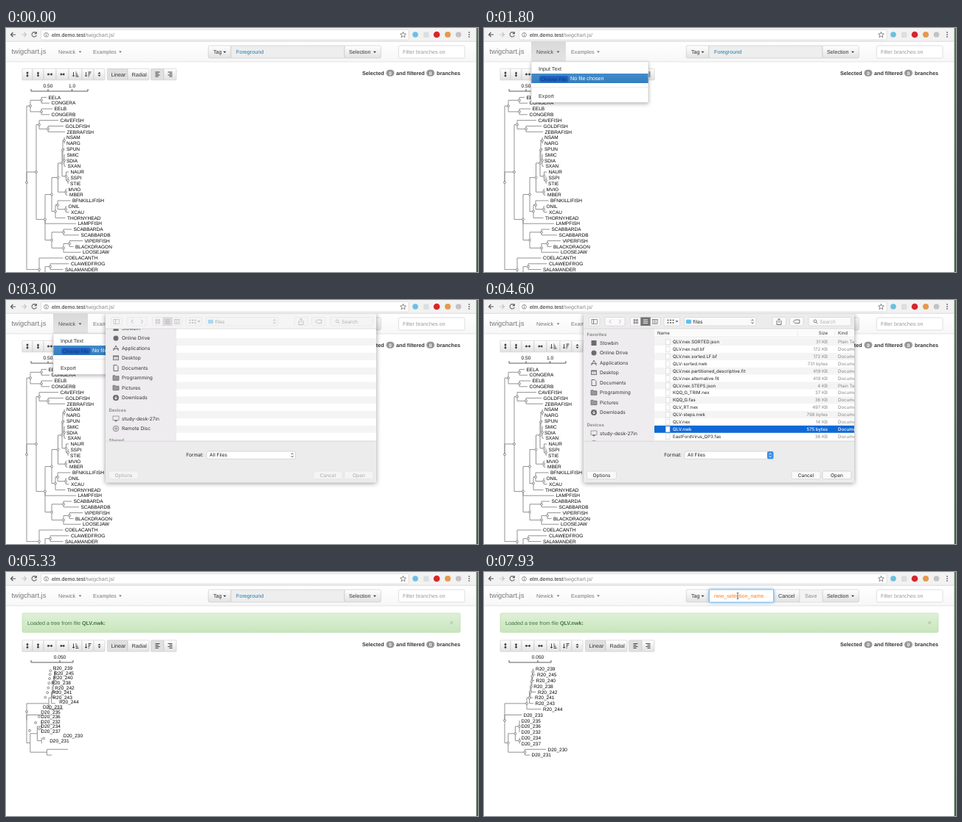
An HTML page for the animation above (8 s loop, 640 px wide and 332 px high).

```html
<!DOCTYPE html>
<html lang="en">
<head>
<meta charset="utf-8">
<title>Tree viewer</title>
<style>
  html, body { margin: 0; width: 100%; height: 100%; overflow: hidden; background: #fff; }
  svg { display: block; width: 100%; height: 100%; font-family: "Liberation Sans", Arial, sans-serif; }
  text { white-space: pre; text-rendering: geometricPrecision; }
  .mac { font-family: Inter, "Open Sans", sans-serif; }
  .menu { filter: drop-shadow(0 2px 2.5px #0004); }
  .sheet { filter: drop-shadow(0 1px 3px #0006); }
  .focus { filter: drop-shadow(0 0 2px #66afe9); }
</style>
</head>
<body>
<svg id="stage" viewBox="0 0 640 332" preserveAspectRatio="none"></svg>
<script>
const LOOP = 8000;
const TIMES = {
  hover: 900, menuOpen: 1130, menuPick: 1500,
  sheetIn: 2553, sheetReady: 3100, filePick: 4130, sheetOut: 4740,
  loaded: 5166, naming: 7130
};
const SLIDE = 250;

// Markup helpers; text is placed by its vertical centre.
const text = (x, y, s, size = 7.2, fill = '#333', attrs = '') =>
  `<text x="${x}" y="${y + size * 0.35}" font-size="${size}" fill="${fill}" ${attrs}>${s}</text>`;
const rect = (x1, y1, x2, y2, fill, stroke = 'none', r = 0) =>
  `<rect x="${x1}" y="${y1}" width="${x2 - x1}" height="${y2 - y1}" rx="${r}" fill="${fill}" stroke="${stroke}" stroke-width=".6"/>`;
const circle = (x, y, r, fill, stroke = 'none') =>
  `<circle cx="${x}" cy="${y}" r="${r}" fill="${fill}" stroke="${stroke}" stroke-width=".7"/>`;
const path = (d, stroke, width = 1, fill = 'none') =>
  `<path d="${d}" fill="${fill}" stroke="${stroke}" stroke-width="${width}"/>`;
const group = (id, body, attrs = '') => `<g id="${id}" ${attrs}>${body}</g>`;
const caret = (x, y, fill) => path(`M${x - 2} ${y - 1}h4l-2 2.2z`, 'none', 0, fill);
const gradient = (id, top, bottom) =>
  `<linearGradient id="${id}" x2="0" y2="1"><stop stop-color="${top}"/><stop offset="1" stop-color="${bottom}"/></linearGradient>`;
const middle = 'text-anchor="middle"', end = 'text-anchor="end"', bold = 'font-weight="bold"';

const defs = `<defs>
  ${gradient('bar', '#fff', '#f7f7f7')}${gradient('button', '#fff', '#e2e2e2')}
  ${gradient('active', '#d9d9d9', '#e4e4e4')}${gradient('success', '#dff0d8', '#c8e5bc')}
  ${gradient('blue', '#428bca', '#357ebd')}${gradient('desk', '#4f7d49', '#2f6d35')}
  <clipPath id="belowBar"><rect x="100" y="18.5" width="440" height="314"/></clipPath>
  <clipPath id="sidebar"><rect x="135" y="39" width="96" height="153"/></clipPath>
  <clipPath id="list"><rect x="231" y="39" width="271" height="153"/></clipPath>
</defs>`;

function browserBar() {
  const dots = [6, 9, 12].map(y => circle(628, y, 0.9, '#666')).join('');
  return rect(0, 0, 638, 18, '#f2f2f2') + rect(0, 17.8, 638, 18.5, '#c9c9c9')
    + rect(47.5, 2.5, 546, 16, '#fff', '#d2d2d2', 1.5)
    + path('M13 9H6.5M9.5 6l-3 3 3 3', '#555', 1.1) + path('M21 9h6.5M24.5 6l3 3-3 3', '#c4c4c4', 1.1)
    + path('M41 7.2a3.2 3.2 0 1 0 .3 2.6M41.4 5v2.6h-2.6', '#666', 1.1)
    + circle(54.5, 9.3, 2.9, 'none', '#666') + path('M54.5 8.8v2.2M54.5 7.2v.8', '#666', 0.8)
    + text(62, 9.3, 'elm.demo.test<tspan fill="#888">/twigchart.js/</tspan>', 7.2, '#222')
    + path('M538.5 5.3l1.1 2.6 2.8.2-2.1 1.8.6 2.8-2.4-1.5-2.4 1.5.6-2.8-2.1-1.8 2.8-.2z', '#555', 0.7)
    + circle(555, 9, 3.8, '#69bfe4') + rect(566, 5.5, 573.5, 13, '#dedede', 'none', 1)
    + circle(584, 9, 4.3, '#d9252a') + circle(599, 9, 4, '#e59a4b') + circle(613.5, 9, 3.8, '#c3c3c3') + dots;
}

function navbar() {
  return rect(0, 18.5, 638, 46, 'url(#bar)') + rect(0, 45.6, 638, 46.3, '#d9d9d9')
    + text(7.5, 32, 'twigchart.js', 9.4, '#777')
    + group('newickActive', rect(64, 18.5, 111, 45.6, 'url(#active)'))
    + group('newick', text(71, 32, 'Newick', 7.2, 'currentColor') + caret(100.5, 32.5, 'currentColor'))
    + text(118, 32, 'Examples', 7.2, '#777') + caret(155, 32.5, '#777')
    + rect(274.3, 24, 305, 41, 'url(#button)', '#c4c4c4', 2)
    + text(281, 32.5, 'Tag') + caret(296.5, 32.8, '#333')
    + group('foreground', rect(305, 24, 459, 41, '#eee', '#c4c4c4') + text(312, 32.5, 'Foreground', 7.2, '#1f77b4'))
    + rect(459, 24, 508.3, 41, 'url(#button)', '#c4c4c4', 2)
    + text(465, 32.5, 'Selection') + caret(500, 32.8, '#333')
    + group('naming', rect(393, 24, 428, 41, 'url(#button)', '#c4c4c4') + text(399, 32.5, 'Cancel')
      + rect(428, 24, 459, 41, '#f3f3f3', '#d4d4d4') + text(435, 32.5, 'Save', 7.2, '#888')
      + `<g class="focus">${rect(305.3, 24, 392.7, 41, '#fff', '#4fa3ea')}</g>`
      + text(312, 32.5, 'new_selection_name', 7.2, '#ff7f0e')
      + path('M342.7 28.5h2.6M344 28.5v8M342.7 36.5h2.6', '#444', 0.7))
    + rect(532.3, 24, 622, 41, '#fff', '#ccc', 2) + text(538, 32.5, 'Filter branches on', 7.2, '#999');
}

// Button row above the tree, drawn around a centre line at y = 63.
function controls() {
  const button = (x1, x2, fill = 'url(#button)') => rect(x1, 55.3, x2, 70.8, fill, '#c8c8c8', 1);
  const edges = [22, 36, 51, 68, 85, 103, 119, 134];
  const sorter = widths => path('M-2.5-3V3M-4 1.5L-2.5 3-1 1.5', '#333', 0.9)
    + path(widths.map((w, i) => `M.5 ${i * 2 - 3}h${w}`).join(''), '#333', 1);
  const icons = [
    path('M0-3V3M-1.3-1.7L0-3 1.3-1.7M-1.3 1.7L0 3 1.3 1.7', '#333', 1.1),
    path('M0-3.2V3.2M-1.3-2.2L0-.8 1.3-2.2M-1.3 2.2L0 .8 1.3 2.2', '#333', 1.1),
    path('M-3 0H3M-1.7-1.3L-3 0-1.7 1.3M1.7-1.3L3 0 1.7 1.3', '#333', 1.1),
    path('M-3.2 0H3.2M-2.2-1.3L-.8 0-2.2 1.3M2.2-1.3L.8 0 2.2 1.3', '#333', 1.1),
    sorter([1, 2, 3, 4]), sorter([4, 3, 2, 1]),
    path('M-2-.7h4L0-3zM-2 .7h4L0 3z', 'none', 0, '#333')
  ];
  const row = icons.map((icon, i) => button(edges[i], edges[i + 1])
    + `<g transform="translate(${(edges[i] + edges[i + 1]) / 2} 63)">${icon}</g>`).join('');
  const lines = (x, dir) => path([6, 4, 6, 4].map((w, i) => `M${x} ${60 + i * 2}h${dir * w}`).join(''), '#333', 0.9);
  const badge = x => rect(x - 5.5, 56.8, x + 5.5, 65.8, '#999', 'none', 4.5) + text(x, 61.3, '0', 6.4, '#fff', bold + ' ' + middle);
  return row + button(137.3, 165, '#e0e0e0') + button(165, 194)
    + text(142.5, 63, 'Linear') + text(170.5, 63, 'Radial')
    + button(196.5, 214, '#e0e0e0') + button(214, 231) + lines(202.5, 1) + lines(225.5, -1)
    + text(483, 61.3, 'Selected', 7.2, '#333', bold) + badge(521)
    + text(529, 61.3, 'and filtered', 7.2, '#333', bold) + badge(575.5)
    + text(584, 61.3, 'branches', 7.2, '#333', bold);
}

const scaleBar = (y, right, ticks) =>
  path(`M34 ${y - 3}V${y}H${right}V${y - 3}` + ticks.map(([x]) => `M${x} ${y - 3}V${y}`).join(''), '#333', 0.8)
  + ticks.map(([x, label]) => text(x, y - 7, label, 6.6, '#111', middle)).join('');

// Reads nested (children)name:x notation; leaves take successive rows.
function parseTree(source, top) {
  const nodes = [];
  let pos = 0, row = 0;
  function read() {
    const kids = [];
    if (source[pos] === '(') {
      do { pos++; kids.push(read()); } while (source[pos] === ',');
      pos++;
    }
    const [all, name, x] = /^(\w*):([\d.]+)/.exec(source.slice(pos));
    pos += all.length;
    const y = kids.length ? kids.reduce((sum, k) => sum + k.y, 0) / kids.length : top + 7.807 * row++;
    const node = { name, x: +x, y, kids };
    nodes.push(node);
    return node;
  }
  read();
  return nodes;
}

function drawTree(nodes) {
  const branches = nodes.flatMap(n => n.kids.map(k => `M${n.x} ${n.y}V${k.y}H${k.x}`)).join('');
  return path(branches, '#929292', 1) + nodes.map(n => `<g class="node" transform="translate(${n.x} ${n.y})">`
    + (n.kids.length ? circle(0, 0, 1.5, '#eee', '#707070') : text(2.5, 0, n.name, 6.5, '#000')) + '</g>').join('');
}

const fishTree = parseTree('(((EELA:55,CONGERA:59):48,(EELB:63,CONGERB:59):48):33,'
  + '((CAVEFISH:71,(GOLDFISH:78,ZEBRAFISH:80):57):45,'
  + '((((((NSAM:79.5,NARG:79.5):79,SPUN:79.5,(SMIC:80,SDIA:79.5,SXAN:81):79):77,'
  + '(NAUR:85,(SSPI:85,STIE:84.5):84):81.5):76,(MVIO:82,MBER:83.5):81):70.5,'
  + '((BFNKILLIFISH:87.5,(ONIL:82,XCAU:85.5):81):70,THORNYHEAD:80.5):67):62,LAMPFISH:95,'
  + '((SCABBARDA:89,SCABBARDB:99):78,((VIPERFISH:104,BLACKDRAGON:91.5):86,LOOSEJAW:101.5):78):62):53):41,'
  + '(COELACANTH:77.5,((CLAWEDFROG:85.5,SALAMANDER:77.5):60,(' + Array(8).fill(':70').join() + '):62):53):45):28', 94.4);

const sampleTree = parseTree('((((((((R20_239:67.5,R20_245:69.5):66.3,R20_240:68):65.5,R20_238:64.8):64.8,'
  + 'R20_242:70.5):64,R20_241:66.5):62.8,R20_243:67):61.5,R20_244:77.5):58,D20_233:51,'
  + '(((D20_235:48,D20_236:48,D20_232:48):48,(D20_234:48.2,D20_237:48.2):48.2):42.4,'
  + '(D20_230:84,D20_231:62):55.5):32.8):28', 132);

const alertBox = () => rect(22, 56, 616, 82.3, 'url(#success)', '#b2dba1', 2)
  + text(29, 69, `Loaded a tree from file <tspan ${bold}>QLV.nwk:</tspan>`, 7.2, '#3c763d')
  + path('M602.2 67l4 4m0-4l-4 4', '#a3bd9b', 0.9);

const newickMenu = () => `<g class="menu">${rect(64, 45.8, 223, 101.3, '#fff', '#c8c8c8', 1.5)}</g>`
  + text(74, 55.3, 'Input Text')
  + group('choosePlain', text(75, 68.3, 'Choose File') + text(117, 68.3, 'No file chosen'))
  + group('chooseHot', rect(64.3, 62, 222.7, 75, 'url(#blue)') + rect(75, 65, 114.5, 74, '#1f62c0', 'none', 3)
    + text(77, 69.3, 'Choose File', 6.6, '#0f3570') + text(117, 68.3, 'No file chosen', 7.2, '#fff'))
  + rect(64.3, 80, 222.7, 80.6, '#e0e0e0') + text(74, 92, 'Export');

const FILES = [
  ['QLV.nex.SORTED.json', '31 KB'], ['QLV.nex.null.bf', '172 KB'], ['QLV.nex.sorted.LF.bf', '172 KB'],
  ['QLV-sorted.nwk', '731 bytes'], ['QLV.nex.partitioned_descriptive.fit', '419 KB'],
  ['QLV.nex.alternative.fit', '419 KB'], ['QLV.nex.STEPS.json', '4 KB'], ['KQQ_G_TRIM.nex', '37 KB'],
  ['KQQ_G.fas', '36 KB'], ['QLV_RT.nex', '497 KB'], ['QLV-steps.nwk', '798 bytes'], ['QLV.nex', '14 KB'],
  ['QLV.nwk', '575 bytes'], ['EastFordVirus_QP3.fas', '36 KB']
];
const PICKED = 12;
const rowY = i => 57 + 9.9 * i;
const rowBand = (i, fill) => rect(231, rowY(i) - 4.95, 502, rowY(i) + 4.95, fill);

function fileRow(i, nameFill, infoFill, attrs) {
  const [name, size] = FILES[i], y = rowY(i);
  const kind = name.endsWith('json') ? 'Plain Text' : 'Document';
  return rect(246.5, y - 3.8, 252, y + 3.8, '#fff', '#d0d0d0') + text(256, y, name, 6.1, nameFill, attrs)
    + text(466, y, size, 6.1, infoFill, attrs + ' ' + end) + text(480, y, kind, 6.1, infoFill, attrs);
}

function sidebar(shift) {
  const ink = '#6c6c6c';
  const icons = [
    ['Stowbin', rect(-3.5, -3.5, 3.5, 3.5, ink)],
    ['Online Drive', circle(0, 0, 3.5, ink)],
    ['Applications', path('M-3.5 3.5L0-3.5 3.5 3.5M-4 1H4', ink)],
    ['Desktop', rect(-4, -3.5, 4, 3, ink) + rect(-3.2, -1.8, 3.2, 2.2, '#d6d6d6')],
    ['Documents', path('M-3-4h4l2 2v6h-6z', ink)],
    ['Programming', path('M-4 3.2v-6.4h3l1 1h4v5.4z', ink, 0.8, '#999')],
    ['Pictures', path('M-4 3.2v-6.4h3l1 1h4v5.4z', ink, 0.8, '#999')],
    ['Downloads', circle(0, 0, 4, ink) + path('M0-2.2v4M-1.7.2L0 2l1.7-1.8', '#fff')]
  ];
  const computers = [
    ['study-desk-27in', rect(-4, -3.5, 4, 2, 'none', ink) + rect(-1.5, 2, 1.5, 3.7, ink)],
    ['Remote Disc', circle(0, 0, 3.8, '#ddd', ink) + circle(0, 0, 1.2, '#eee', ink)]
  ];
  const item = (first, step) => ([name, icon], i) => {
    const y = first + i * step;
    return `<g transform="translate(149 ${y})">${icon}</g>` + text(157, y, name, 6.6, '#333');
  };
  const heading = (y, s) => text(139.5, y, s, 6, '#808080', 'font-weight="600"');
  return `<g clip-path="url(#sidebar)">${rect(135, 39, 231, 192, '#eeecef')}<g transform="translate(0 ${shift})">`
    + heading(47, 'Favorites') + icons.map(item(58.5, 13.5)).join('')
    + heading(170, 'Devices') + computers.map(item(181.5, 13.5)).join('') + heading(211, 'Shared') + '</g></g>';
}

function fileDialog(ready) {
  const ink = ready ? '#555' : '#b5b5b5', face = ready ? '#fafafa' : '#f4f4f4', edge = ready ? '#cfcfcf' : '#e2e2e2';
  const label = ready ? '#222' : '#aaa';
  const box = (x1, x2) => rect(x1, 23.5, x2, 35, face, edge, 1.5);
  const panel = rect(146, 26.3, 153.5, 32.3, 'none', ink) + path('M148.6 26.3v6', ink, 0.8);
  const chevrons = path('M172.5 26.7l-2.5 2.6 2.5 2.6M183 26.7l2.5 2.6-2.5 2.6', '#b0b0b0', 0.9);
  const squares = path('M203 26.5h2v2h-2zM206.5 26.5h2v2h-2zM203 30h2v2h-2zM206.5 30h2v2h-2z', ink, 0.7);
  const lines = path('M215.8 27h6.4M215.8 29.3h6.4M215.8 31.6h6.4', ready ? '#fff' : ink, 0.9);
  const columns = rect(228.5, 26.3, 235.5, 32.3, 'none', ink) + path('M230.8 26.3v6M233.2 26.3v6', ink, 0.7);
  const arrows = (x, y, color) => path(`M${x - 1.5} ${y - 1}l1.5-1.7 1.5 1.7M${x - 1.5} ${y + 1}l1.5 1.7 1.5-1.7`, color, 0.9);
  const button = (x1, x2, s, fill) => rect(x1, 233, x2, 243.5, face, edge, 2) + text((x1 + x2) / 2, 238.3, s, 6.6, fill, middle);

  const toolbar = box(142.5, 157) + panel + box(164, 191) + chevrons
    + box(198.5, 239) + rect(212.3, 23.5, 225.7, 35, ready ? '#737373' : '#dadada') + squares + lines + columns
    + box(244, 265.5) + path('M248.5 27.5h2M252 27.5h2M255.5 27.5h2M248.5 31h2M252 31h2M255.5 31h2', ink, 1.6) + caret(261.5, 29.2, ink)
    + box(271.5, 369) + rect(274, 26.7, 281, 32.2, ready ? '#62bdea' : '#a8d8ee', 'none', 0.8)
    + text(283.5, 29.3, 'files', 6.6, label) + arrows(364, 29.3, ink)
    + box(391, 409.5) + path('M398 28.5h-1v5h6v-5h-1M400 31v-5.5M398.3 27l1.7-1.7 1.7 1.7', ink, 0.8)
    + box(414.5, 433) + path('M419.5 29.3l2.3-2.3h6v4.6h-6z', ink, 0.8)
    + box(440, 497.5) + circle(449, 28.8, 1.9, 'none', ink) + path('M450.4 30.2l2 2', ink, 0.9)
    + text(455, 29.3, 'Search', 6.6, '#b0b0b0');

  const stripes = Array.from({ length: 8 }, (_, i) => rowBand(2 * i, '#f4f4f4')).join('');
  const header = rect(231, 39, 502, 50.5, '#fbfbfb') + rect(231, 50.3, 502, 50.8, '#d5d5d5')
    + text(235, 45, 'Name', 6.1, '#333') + text(466, 45, 'Size', 6.1, '#333', end) + text(480, 45, 'Kind', 6.1, '#333')
    + path('M425 41v8M476 41v8', '#e2e2e2', 0.6);
  const rows = FILES.map((_, i) => fileRow(i, '#222', '#858585', '')).join('');
  const list = `<g clip-path="url(#list)">${rect(231, 39, 502, 192, '#fff') + stripes + (ready ? header + rows : '')}</g>`;

  const format = text(268, 211, 'Format:', 6.6, '#222', end) + rect(272, 206, 392.5, 216.3, '#fff', '#c4c4c4', 2)
    + text(276, 211, 'All Files', 6.6, '#222')
    + (ready ? rect(384, 206, 392.5, 216.3, '#3d8fe6', 'none', 2) : '') + arrows(388.2, 211.2, ready ? '#fff' : '#444');

  return rect(135, 18, 502, 248.5, '#ececec') + rect(135, 18, 502, 39, ready ? '#ececec' : '#f5f5f5')
    + toolbar + sidebar(ready ? 0 : -20) + list + path('M135 39h367M135 192.2h367', '#d0d0d0', 0.7) + format
    + button(139.5, 179.5, 'Options', label) + button(417, 456, 'Cancel', label) + button(459, 498, 'Open', '#aaa');
}

const pickedFile = () => `<g clip-path="url(#list)">`
  + rowBand(PICKED, '#1169d6') + fileRow(PICKED, '#fff', '#fff', 'font-weight="500"') + '</g>'
  + rect(459, 233, 498, 243.5, '#fafafa', '#cfcfcf', 2) + text(478.5, 238.3, 'Open', 6.6, '#222', middle);

const stage = document.getElementById('stage');
stage.innerHTML = defs + rect(0, 0, 640, 332, '#fff')
  + group('fish', scaleBar(86, 111, [[57, '0.50'], [89.5, '1.0']]) + drawTree(fishTree))
  + group('sample', alertBox() + scaleBar(123, 91, [[73, '0.050']]) + drawTree(sampleTree))
  + group('controls', controls())
  + navbar() + group('menu', newickMenu())
  + `<g clip-path="url(#belowBar)">${group('sheet',
      group('idle', fileDialog(false)) + group('ready', fileDialog(true)) + group('picked', pickedFile()),
      'class="sheet mac"')}</g>`
  + browserBar() + rect(637, 0, 638, 332, '#c2c2c2') + rect(638, 0, 640, 332, 'url(#desk)');

const byId = id => document.getElementById(id);
const show = (id, on) => byId(id).style.display = on ? '' : 'none';
const sampleNodes = [...byId('sample').querySelectorAll('.node')];

// Cubic ease in and out over SLIDE milliseconds from the given start.
function progress(t, start) {
  const p = Math.min(1, Math.max(0, (t - start) / SLIDE));
  return p < 0.5 ? 4 * p ** 3 : 1 - 4 * (1 - p) ** 3;
}

function render(t) {
  const within = (from, to = LOOP) => t >= from && t < to;
  const loaded = within(TIMES.loaded), ready = within(TIMES.sheetReady), naming = within(TIMES.naming);
  const menuOpen = within(TIMES.menuOpen, TIMES.sheetReady);

  show('newickActive', menuOpen);
  byId('newick').style.color = menuOpen ? '#555' : within(TIMES.hover, TIMES.menuOpen) ? '#222' : '#777';
  show('menu', menuOpen);
  show('choosePlain', t < TIMES.menuPick);
  show('chooseHot', t >= TIMES.menuPick);

  const drop = progress(t, TIMES.sheetIn) - progress(t, TIMES.sheetOut);
  show('sheet', drop > 0);
  byId('sheet').setAttribute('transform', `translate(0 ${-230 * (1 - drop)})`);
  show('idle', !ready);
  show('ready', ready);
  show('picked', within(TIMES.filePick));

  show('fish', !loaded);
  show('sample', loaded);
  byId('controls').setAttribute('transform', `translate(0 ${loaded ? 37.5 : 0})`);
  const spread = progress(t, TIMES.loaded);
  sampleTree.forEach((n, i) => sampleNodes[i].setAttribute('transform',
    `translate(${28 + (n.x - 28) * spread} ${126 + (n.y - 126) * spread})`));

  show('foreground', !naming);
  show('naming', naming);
}

function tick() {
  render(performance.now() % LOOP);
  requestAnimationFrame(tick);
}
tick();
</script>
</body>
</html>
```
